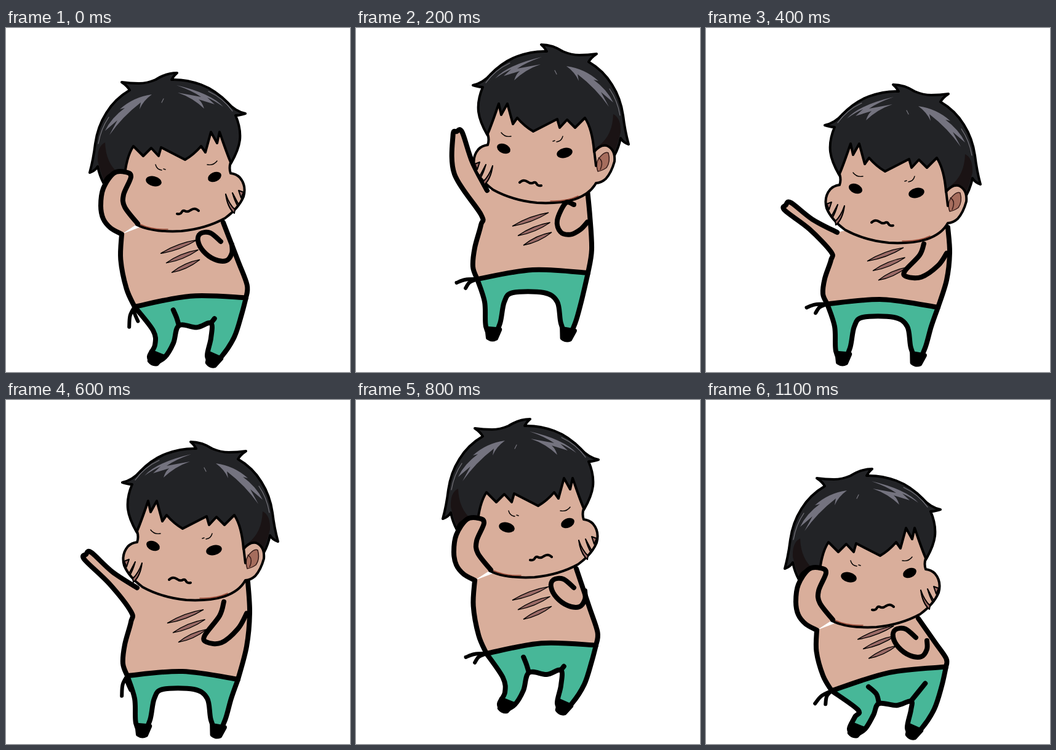
Write an HTML page that moves like this. It is 559 by 559 pixels and loops after 1200 ms.

```html
<!DOCTYPE html>
<html lang="en">
<head>
<meta charset="utf-8">
<title>Dancing boy</title>
<style>
html, body { margin: 0; width: 100%; height: 100%; overflow: hidden; background: #fff; }
svg { display: block; width: 100vw; height: 100vh; }
.line { fill: none; stroke: #000; stroke-linecap: round; stroke-linejoin: round; }
</style>
</head>
<body>
<svg viewBox="0 0 559 559">
  <defs>
    <g id="head" stroke-linejoin="round" stroke-linecap="round">
      <path fill="#222326" stroke="#000" stroke-width="4" d="M190 83Q207 79 218 66Q238 45 262 36Q287 27 310 28Q306 21 301 17Q319 17 336 28Q350 34 363 34Q377 34 391 32Q382 38 378 45Q402 59 416 82Q430 104 434 132Q437 157 443 179Q434 176 430 169Q427 184 420 197L400 238L230 190L213 163Q201 142 199 126Q197 107 206 86Q199 86 190 83Z"/>
      <path fill="#1a1314" d="M418 130Q431 136 430 160Q423 187 418 194L412 182L395 181Q417 164 418 130Z"/>
      <path fill="#74737f" d="M226 72Q246 50 302 37Q276 46 262 56L300 49Q276 57 257 75Q260 65 266 60L240 68L252 57Q240 62 226 72ZM342 52Q372 56 394 76L386 74Q408 90 418 111L398 94L411 118Q390 88 360 65L362 76Q356 62 342 52Z"/>
      <path class="line" style="stroke:#77767d" stroke-width="1.2" d="M211 79Q226 58 250 47M412 89Q425 108 429 132M323 59L326 65"/>
      <path fill="#d9ae9b" stroke="#000" stroke-width="4" d="M214 162Q220 148 232 113L236 131L246 113L255 146L262 136Q274 150 288 158L327 138L331 152L343 139L356 152L372 136Q384 154 387 191Q397 179 407 181Q422 187 420 207Q415 225 406 235Q398 242 390 242Q380 260 356 268Q331 276 294 274Q254 270 223 253Q201 237 193 218Q188 200 199 187Q205 181 214 180Q217 172 214 162Z"/>
      <path fill="#a66d5d" stroke="#351b18" stroke-width="1.5" d="M393 223Q388 208 397 199Q405 190 410 193Q414 207 407 217Q400 222 393 223ZM394 201Q403 206 397 220"/>
      <path class="line" stroke-width="4" d="M387 189L390 214"/>
      <path class="line" style="stroke:#9b4b38" stroke-width="1.5" d="M316 271Q342 272 361 263"/>
      <ellipse cx="240" cy="186" rx="11.500" ry="7.500" transform="rotate(23 240 186)"/>
      <ellipse cx="339" cy="193" rx="13" ry="8" transform="rotate(-14 339 193)"/>
      <path class="line" stroke-width="1.400" d="M236 160Q242 168 252 166M320 174L323 173M326 175Q334 174 336 166"/>
      <path class="line" stroke-width="4" d="M266 241Q272 235 279 240Q284 244 289 241Q292 240 294 244Q296 247 301 246"/>
      <path fill="#9a6a66" stroke="#000" stroke-width="2" d="M193 211L201 208L197 220ZM211 212Q207 226 202 234L201 231ZM222 214Q219 236 208 245L207 239Q216 231 222 214Z"/>
    </g>
  </defs>
  <g id="boy"></g>
</svg>
<script>
const SKIN = '#d9ae9b', GREEN = '#47b798', INK = '#000';
const STEP = 100, STEPS = 12, WIDTH = 8, MIRROR = 579;

// head offset on each step of the dance
const heads = [
  [0, 56], [0, 0], [0, 10], [-1, 48], [3, 75], [7, 88],
  [-1, 51], [-10, -9], [5, 14], [11, 62.5], [4, 88], [-8, 95]
];
const lifts = [0, 50, 40, 0, 0, 0];

const mix = (a, b, t) => a.map((v, i) => v + (b[i] - v) * t);
const add = (a, x, y = 0) => [a[0] + x, a[1] + y];

// Catmull-Rom curve through the points
function curve(p, command = 'M') {
  let d = command + p[0];
  for (let i = 0; i < p.length - 1; i++) {
    const a = p[i - 1] || p[i], b = p[i], c = p[i + 1], e = p[i + 2] || c;
    const near = b.map((v, k) => v + (c[k] - a[k]) / 6);
    const far = c.map((v, k) => v - (e[k] - b[k]) / 6);
    d += `C${near} ${far} ${c}`;
  }
  return d;
}

const fill = (d, color) => `<path d="${d}Z" fill="${color}"/>`;
const line = (d, width = WIDTH) => `<path class="line" d="${d}" stroke-width="${width}"/>`;

function scars([x, y]) {
  const cut = i => {
    const from = [x + 9 * i, y + 15.5 * i], to = [x + 59 + 2.5 * i, y - 22 + 16 * i];
    const mid = mix(from, to, .5);
    return `<path d="M${from}Q${add(mid, -2, -6)} ${to}Q${add(mid, 2, 6)} ${from}Z" fill="#9a6a66" stroke="${INK}" stroke-width="1.3"/>`;
  };
  return [0, 1, 2].map(cut).join('');
}

function foot([x, y], tilt) {
  return `<path d="M-10 -9H11L6 6Q0 10 -7 6Z" stroke="${INK}" stroke-width="7" stroke-linejoin="round" transform="translate(${x} ${y}) rotate(${tilt})"/>`;
}

function cords(root, beat) {
  const angle = 105 + 75 * Math.sin(Math.PI * beat / 6);
  return [[angle, 34], [angle - 28, 24]].map(([degrees, length]) => {
    const a = degrees * Math.PI / 180;
    const end = add(root, length * Math.cos(a), length * Math.sin(a));
    return line(curve([root, add(mix(root, end, .5), -3, -2), end]), 6);
  }).join('');
}

// a raised arm: from the armpit around the hand and back below the elbow
function reach(armpit, tip, below, bow) {
  const dx = tip[0] - armpit[0] + 5, dy = tip[1] - armpit[1] - 18, r = 8 / Math.hypot(dx, dy);
  return [
    armpit, mix(armpit, tip, .5), add(tip, -dy * r, dx * r), add(tip, dx * r / 2, dy * r / 2),
    add(tip, dy * r, -dx * r), add(mix(below, tip, .5), -bow), below
  ];
}

function facingLeft(x, lift, crouch) {
  const at = (px, py) => [px, py + crouch * Math.max(0, 450 - py) / 130 - lift];
  const raise = lift * (1 + x / 20), up = raise / 50;
  const list = pts => pts.map(p => at(...p));
  const open = [[354, 327], [347, 350], [323, 382], [326, 393], [350, 394], [377, 371], [391, 346]];
  const curled = [[354, 327], [339, 318], [328, 345], [334, 366], [348, 371], [361, 367], [372, 358]];
  const hip = at(197, 448), side = at(377, 454 - raise * .4);
  return {
    left: [
      ...reach(at(213, 304), at(133 + raise * .8, 252 - raise), at(203, 343), raise * .6),
      ...list([[203, 360], [193, 397], [190, 428]]), hip
    ],
    right: [...list([[393 - raise * .45, 294], [396 - raise * .4, 345], [391 - raise * .2, 400]]), side],
    legs: [hip, ...list([
      [209, 485], [211, 525], [222, 541], [234, 520], [241, 485], [255, 470], [305, 470],
      [327, 485], [333, 520], [344, 541], [356, 520], [366, 485]
    ]), side],
    feet: [foot(at(222, 538), 5), foot(at(343, 539), 10)],
    folds: [],
    hand: list(open.map((p, i) => mix(p, curled[i], up))),
    scar: at(262 - raise * .2, 362)
  };
}

function facingRight(x, y, lift, crouch) {
  const at = (px, py, sink = 0) => [px, py + crouch * sink - lift];
  const onHead = pts => pts.map(p => add(p, x, y));
  const arm = onHead([
    [214, 262], [193, 235], [191, 215], [203, 186], [194, 178], [175, 180],
    [158, 205], [154, 233], [158, 254], [170, 269], [188, 279]
  ]);
  const top = arm[arm.length - 1], [shoulder] = onHead([[353, 260]]);
  const hip = at(209 + x * .6, 450, .5), side = at(390, 439, -.12);
  const crotch = at(281, 482, .25), seat = at(333, 478, .25);
  return {
    arm,
    left: [top, add(mix(top, hip, .35), -9), add(mix(top, hip, .75), -8), hip],
    right: [shoulder, add(mix(shoulder, side, .5), 5), add(mix(shoulder, side, .83), 8), side],
    legs: [
      hip, at(238 + crouch * .2, 490, .3), at(242, 515), at(233, 534), at(241, 543), at(258, 535),
      at(272, 512), crotch, at(310, 485, .25), seat, at(333, 504), at(327, 533), at(337, 543),
      at(351, 533), at(371, 502), at(383, 465), side
    ],
    feet: [foot(at(242, 538), 22), foot(at(336, 541), 24)],
    folds: [
      [at(273 - crouch * .2, 457, .2), at(277, 469, .2), crotch],
      [seat, at(336 + crouch * .45, 474, -.3)]
    ],
    hand: onHead([
      [349, 291], [332, 277], [316, 278], [312, 290], [321, 307],
      [339, 320], [358, 322], [367, 310], [367, 296]
    ]),
    scar: at(251 + x * .6, 363, .58)
  };
}

function draw(step) {
  const [x, y] = heads[step], beat = step % 6, lift = lifts[beat];
  const crouch = y + lift - 50;
  const mirrored = step < 1 || step > 7;
  const body = mirrored ? facingRight(x, y, lift, crouch) : facingLeft(x, lift, crouch);
  const { left, right, legs, arm } = body;
  const hip = left[left.length - 1], side = right[right.length - 1];
  const waist = [hip, add(mix(hip, side, .5), 0, -10), side];
  const place = mirrored ? `translate(${MIRROR + x} ${y}) scale(-1 1)` : `translate(${x} ${y})`;
  const neck = [290 + x, 240 + y];
  const torso = curve(left) + curve(waist, 'L') + curve([...right].reverse(), 'L') + 'L' + neck;
  const pants = curve(legs) + curve([...waist].reverse(), 'L');

  return [
    fill(torso, SKIN), scars(body.scar), line(curve(left)), line(curve(right)),
    fill(pants, GREEN), line(pants),
    ...body.folds.map(f => line(curve(f))),
    ...body.feet, cords(hip, beat),
    `<use href="#head" transform="${place}"/>`,
    arm ? fill(curve(arm), SKIN) + line(curve(arm)) : '',
    line(curve(body.hand))
  ].join('');
}

const boy = document.getElementById('boy');
const start = performance.now();
let shown = -1;

function update(now) {
  const step = Math.floor(Math.max(0, now - start) / STEP) % STEPS;
  if (step !== shown) boy.innerHTML = draw(shown = step);
  requestAnimationFrame(update);
}
update(start);
</script>
</body>
</html>
```
